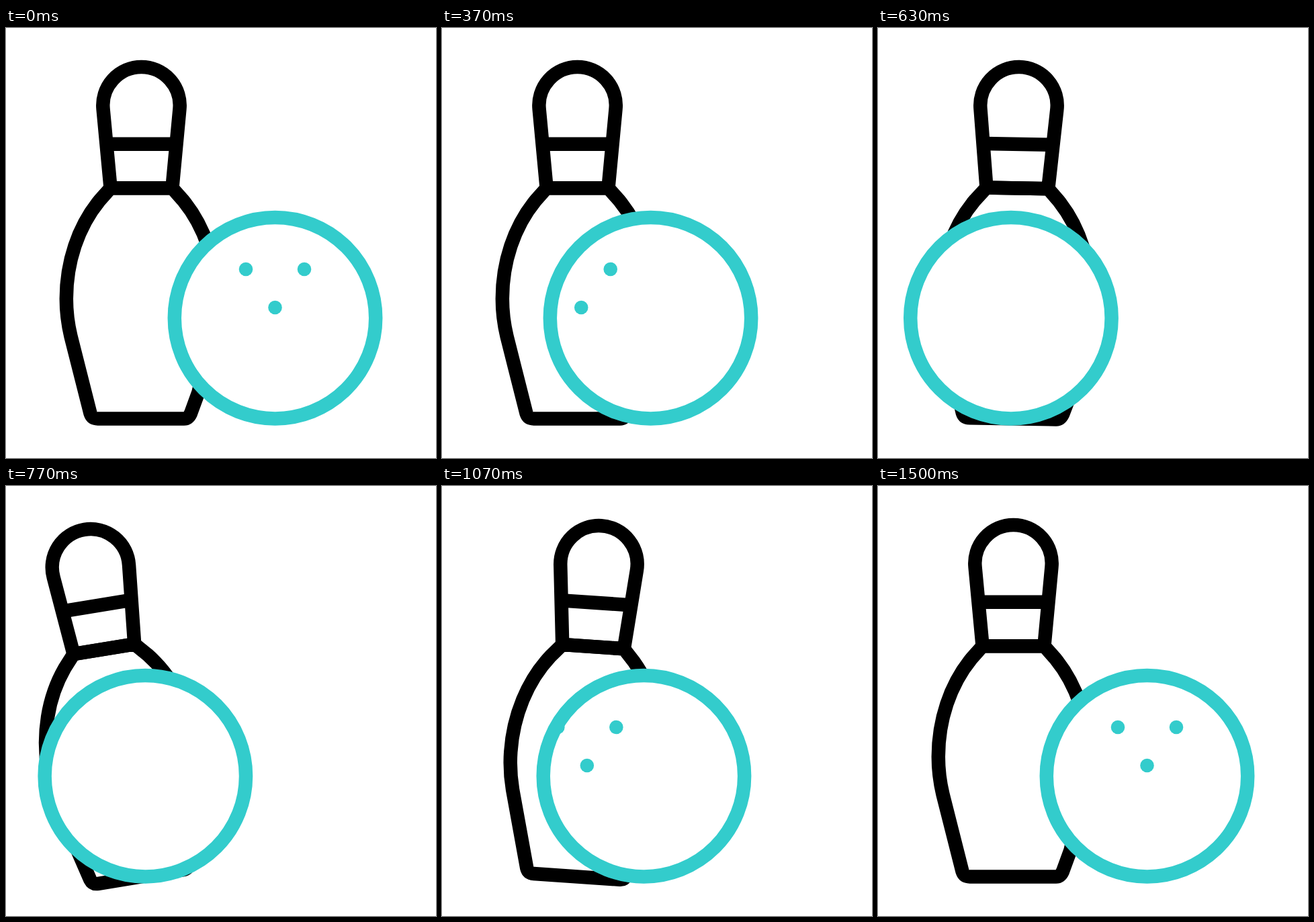
Recreate the animation shown at these times as an HTML page. Size 640 by 640 pixels, loop 1670 ms.

```html
<!DOCTYPE html>
<html lang="en">
<head>
<meta charset="utf-8">
<title>Bowling</title>
<style>
  html, body { margin: 0; width: 100%; height: 100%; overflow: hidden; background: #fff; }
  svg { display: block; width: 100%; height: 100%; }
  .line { fill: none; stroke: #000; stroke-width: 20.5; stroke-miterlimit: 10; }
  .ring { fill: none; stroke: #33cccc; stroke-width: 20.5; }
  .dots { fill: #33cccc; }
</style>
</head>
<body>
<svg viewBox="0 0 640 640">
  <defs>
    <clipPath id="inside"><circle id="mask" cx="400.5" cy="431.7" r="150"/></clipPath>
  </defs>
  <g id="pin" class="line">
    <path d="M155.6 238.3 L144.6 121 A57.2 57.2 0 1 1 258.4 121 L247.4 238.3 Z"/>
    <path d="M152 172.8 H251"/>
    <path d="M155.6 238.3 L139 257 C107 296 89.8 349 89.8 403 Q89.8 431 96.5 459
      L125.5 573.5 Q128 581.4 136.5 581.4 H265 Q271.5 581.4 275 573.5 L286.5 542 L306.5 459
      Q313.2 431 313.2 403 C313.2 349 296 296 264 257 L247.4 238.3 Z"/>
  </g>
  <circle id="ball" cx="400.5" cy="431.7" r="149.7" fill="#fff"/>
  <g clip-path="url(#inside)">
    <g id="dots" class="dots">
      <circle cx="357" cy="359" r="10.3"/>
      <circle cx="444" cy="359" r="10.3"/>
      <circle cx="400.5" cy="416" r="10.3"/>
    </g>
  </g>
  <circle id="ring" class="ring" cx="400.5" cy="431.7" r="149.7"/>
</svg>
<script>
  const LOOP = 1670, STEP = 100 / 3, LAST = 45;
  const [pin, ball, ring, mask, dots] =
    ['pin', 'ball', 'ring', 'mask', 'dots'].map(id => document.getElementById(id));

  // Turning points of the wobbling pin: [step, degrees]
  const swings = [[0, 0], [8, -11.6], [15, 17.9], [22, -10], [30, 5.5], [37, -2.4], [LAST, 0]];

  // Smooth 0 to 1 between two steps; a higher power delays the start.
  function ease(from, to, step, power = 1) {
    const u = Math.min(1, Math.max(0, (step - from) / (to - from))) ** power;
    return u * u * (3 - 2 * u);
  }

  const tilt = step => swings.slice(1).reduce((sum, [to, angle], i) => {
    const [from, before] = swings[i];
    return sum + (angle - before) * ease(from, to, step);
  }, 0);

  const shift = (el, x) => el.setAttribute('transform', `translate(${x.toFixed(2)} 0)`);

  function draw(now) {
    const step = Math.min(LAST, Math.floor((now % LOOP + 4) / STEP));
    const out = ease(4.9, 18.1, step);
    const roll = 203 * (ease(17, 41, step, 1.455) - out);
    const spin = 436 * (ease(25, 37.7, step) - out);
    pin.setAttribute('transform', `rotate(${tilt(step).toFixed(3)} 201 581)`);
    for (const el of [ball, ring, mask]) shift(el, roll);
    shift(dots, spin);
  }

  const start = performance.now();
  function tick() {
    draw(performance.now() - start);
    requestAnimationFrame(tick);
  }
  tick();
</script>
</body>
</html>
```
